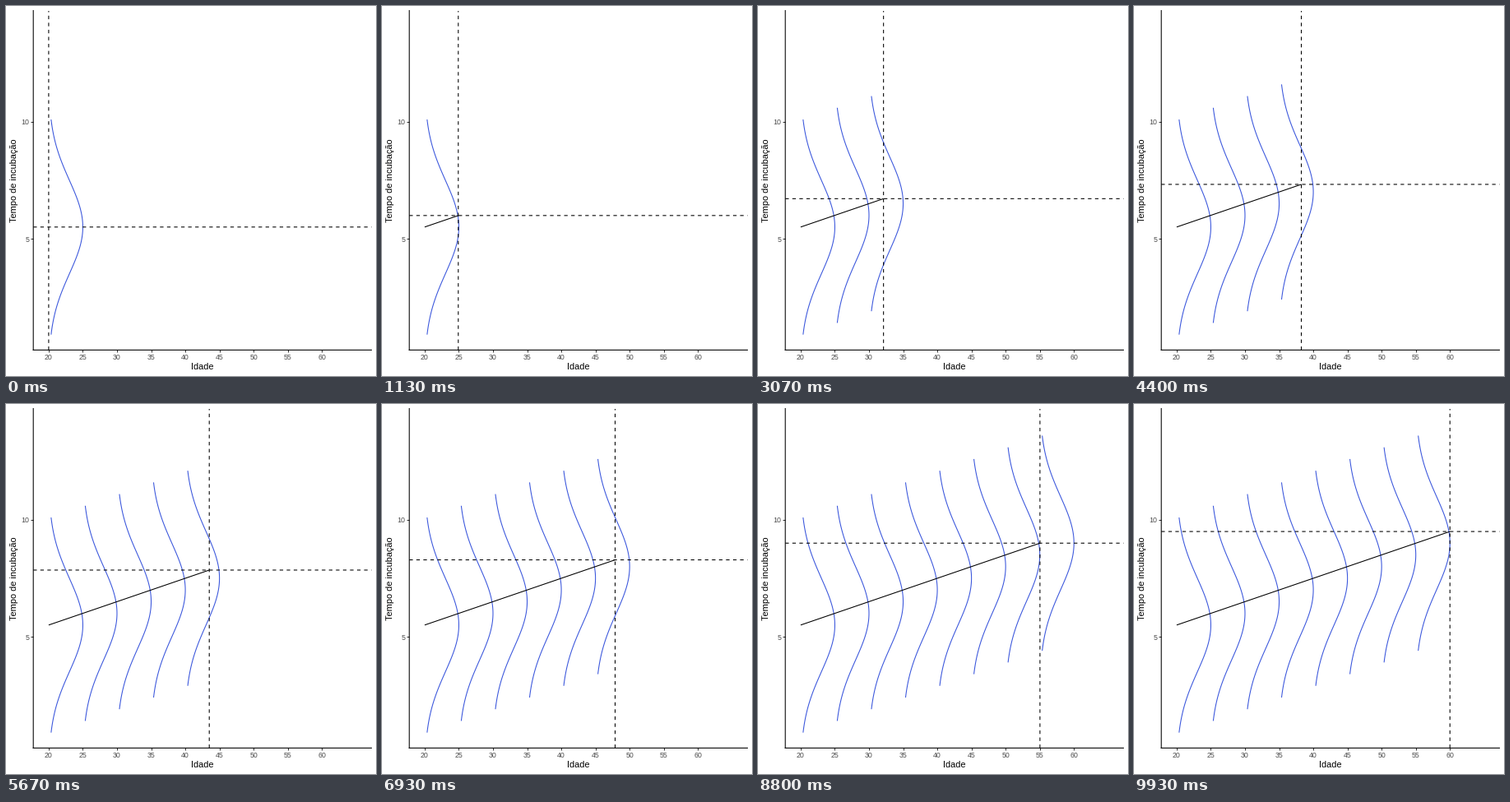
Write a matplotlib script that moves like this. It is 450 px wide and 450 px high and loops after 10000 ms.

```python
import numpy as np
import matplotlib.pyplot as plt
from matplotlib.animation import FuncAnimation

SIZE, DPI = 450, 72
FRAMES, LOOP_MS = 150, 10000
LINE = 1.07
BLUE = "#3a56dc"
LEFT, RIGHT, TOP, BOTTOM = 33.2, 444.5, 5.5, 418.4

plt.rcParams["font.family"] = "Liberation Sans"

ages = np.arange(20, 61, 5)
keys = np.round((FRAMES - 1) * np.arange(len(ages)) / (len(ages) - 1)).astype(int)


def mean_time(age):
    return 5.5 + 0.1 * (age - 20)


def ease(p):
    """Cubic in-out."""
    return 4 * p**3 if p < 0.5 else 1 - 4 * (1 - p)**3


def age_at(frame):
    k = min(np.searchsorted(keys, frame, side="right") - 1, len(keys) - 2)
    p = (frame - keys[k]) / (keys[k + 1] - keys[k])
    return ages[k] + 5 * ease(p)


fig = plt.figure(figsize=(SIZE / DPI, SIZE / DPI), dpi=DPI, facecolor="white")
ax = fig.add_axes([LEFT / SIZE, 1 - BOTTOM / SIZE,
                   (RIGHT - LEFT) / SIZE, (BOTTOM - TOP) / SIZE])
ax.set_xlim(17.75, 67.25)
ax.set_ylim(0.24, 14.76)
ax.set_xticks(ages)
ax.set_yticks([5, 10])
ax.tick_params(length=2.75, width=LINE, pad=2.2, color="#333333",
               labelcolor="#4d4d4d", labelsize=8.8)
ax.spines[["top", "right"]].set_visible(False)
for side in ("left", "bottom"):
    ax.spines[side].set_linewidth(LINE)
    ax.spines[side].set_snap(False)
for axis in (ax.xaxis, ax.yaxis):
    for tick in axis.get_major_ticks():
        tick.tick1line.set_snap(False)

fig.text((LEFT + RIGHT) / 2 / SIZE, 1 - 442.4 / SIZE, "Idade",
         size=11, ha="center", va="baseline")
fig.text(13.4 / SIZE, 1 - (TOP + BOTTOM) / 2 / SIZE, "Tempo de incubação",
         size=11, ha="center", va="baseline",
         rotation=90, rotation_mode="anchor")

# Sideways normal curves (sd = 2), one per age
offset = np.linspace(-4.6, 4.6, 120)
bell = 5 * np.exp(-offset**2 / 8)
curves = [ax.plot(age + bell, mean_time(age) + offset, color=BLUE, lw=LINE,
                  solid_capstyle="butt", snap=False)[0] for age in ages]

dashed = dict(color="black", lw=LINE, ls=(0, (4, 4)), dash_capstyle="butt",
              snap=False, zorder=4)
trend, = ax.plot([], [], color="black", lw=LINE, solid_capstyle="butt",
                 snap=False, zorder=3)
vline = ax.axvline(20, **dashed)
hline = ax.axhline(5.5, **dashed)


def draw(frame):
    age = age_at(frame)
    y = mean_time(age)
    for curve, key in zip(curves, keys):
        curve.set_visible(frame >= key)
    trend.set_data([20, age], [mean_time(20), y])
    vline.set_xdata([age, age])
    hline.set_ydata([y, y])
    return [*curves, trend, vline, hline]


anim = FuncAnimation(fig, draw, frames=FRAMES, interval=LOOP_MS / FRAMES,
                     repeat=True, repeat_delay=0)
plt.show()
```
